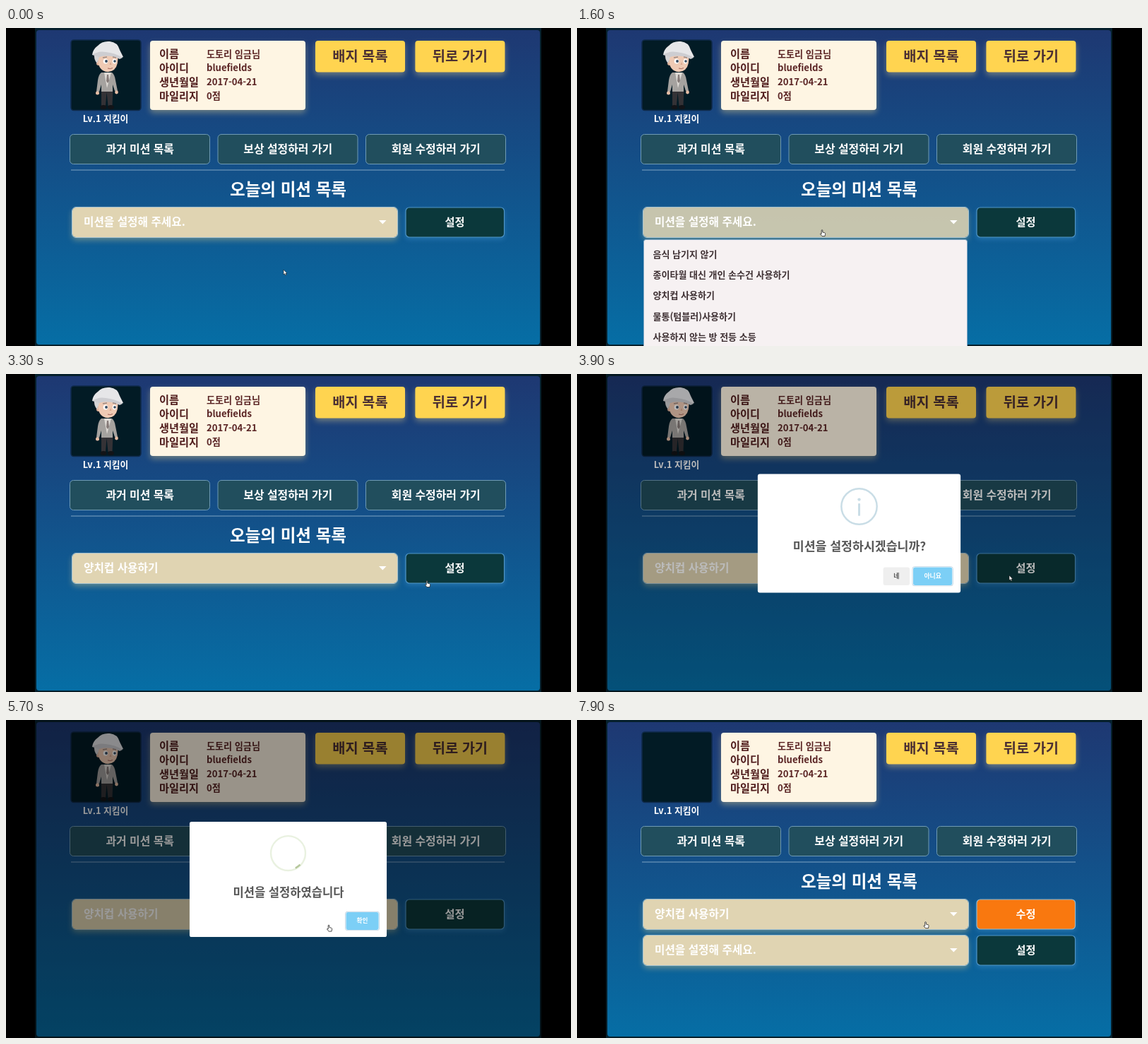
An HTML page for the animation above (8000 ms loop, 800 px wide and 450 px high).

```html
<!DOCTYPE html>
<html lang="ko">
<head>
<meta charset="utf-8">
<style>
html, body { margin: 0; width: 100%; height: 100%; overflow: hidden; background: #000; }
svg { display: block; width: 800px; height: 450px; }
text { font-family: "Noto Sans CJK KR", "Noto Sans CJK", sans-serif; }
.warm { filter: drop-shadow(0 4px 4px rgba(238, 214, 140, .4)); }
.cool { filter: drop-shadow(0 3px 3px rgba(60, 140, 200, .45)); }
</style>
</head>
<body>
<svg id="stage" viewBox="0 0 800 450"></svg>
<script>
const LOOP = 8000;
const OPEN = 1200, PICK = 2500, ASK = 3700, DONE = 5450, CLOSE = 7200, RELOAD = 7500;

// cy is the vertical middle of the glyphs
const text = (x, cy, size, fill, str, anchor = 'start') =>
  `<text x="${x}" y="${cy + size * .36}" font-size="${size}" fill="${fill}" text-anchor="${anchor}" font-weight="700">${str}</text>`;
const mid = (x, cy, size, fill, str) => text(x, cy, size, fill, str, 'middle');
const rect = (x, y, w, h, r, fill, more = '') =>
  `<rect x="${x}" y="${y}" width="${w}" height="${h}" rx="${r}" fill="${fill}" ${more}/>`;
const group = (id, body) => `<g id="${id}">${body}</g>`;

const info = [
  ['이름', '도토리 임금님'], ['아이디', 'bluefields'],
  ['생년월일', '2017-04-21'], ['마일리지', '0점']
].map(([key, val], i) =>
  text(217, 37 + i * 19.7, 15.2, '#4f1c1c', key) +
  text(284, 37 + i * 19.7, 13.1, '#5a2424', val)).join('');

const links = ['과거 미션 목록', '보상 설정하러 가기', '회원 수정하러 가기'].map((s, i) =>
  rect(90.5 + i * 209.5, 150.5, 198, 42, 5, '#214e5d', 'stroke="#6f9bb5"') +
  mid(189.7 + i * 209.5, 171, 15.9, '#fff', s)).join('');

const gold = ['배지 목록', '뒤로 가기'].map((s, i) =>
  rect(438 + i * 141.4, 18, 127, 44.5, 4, '#ffd450', 'class="warm"') +
  mid(501.5 + i * 141.4, 40, 19.8, '#4c3033', s)).join('');

const select = (y, id, label) =>
  group(id, rect(94, y, 460, 42, 5, '#e0d4b2', 'class="warm"')) +
  rect(93.5, y - .5, 461, 43, 5.5, 'none', 'stroke="#a3c2d2"') +
  `<g id="${id}Text">${text(110, y + 20.5, 15.7, '#fff', label)}</g>` +
  `<path d="M528 ${y + 18}h10.5l-5.2 5.4z" fill="#fff"/>`;

const button = (y, label, fill, line) =>
  rect(566, y, 139.5, 42, 5, fill, `stroke="${line}" stroke-width="1.2" class="cool"`) +
  mid(635.5, y + 20.5, 15.2, '#fff', label);

const items = ['음식 남기지 않기', '종이타월 대신 개인 손수건 사용하기', '양치컵 사용하기',
  '물통(텀블러)사용하기', '사용하지 않는 방 전등 소등'];
const menu = rect(94.5, 299.5, 458, 170, 3, '#f6f1f2', 'stroke="#7fa6c4"') +
  items.map((s, i) => text(107.5, 320.3 + i * 29.2, 13, '#3f3134', s)).join('');

const boy = `
  <path d="M135 86l0 24h6l1.5-19 2 19h6l1-24z" fill="#343236"/>
  <ellipse cx="138" cy="112" rx="4.5" ry="3" fill="#121418"/><ellipse cx="148.500" cy="112" rx="4.500" ry="3" fill="#121418"/>
  <path d="M135 63q-4 3-5 11l-2 16h4l3-10v10h16V80l3 9h4l-3-15q-1-8-5-11z" fill="#a5a29f"/>
  <path d="M139 63l4 22 6-22z" fill="#dedad5"/><path d="M143 66h2l1 9-2 3-2-3z" fill="#857a78"/>
  <circle cx="129.500" cy="92" r="2.500" fill="#e6bda5"/><circle cx="156.500" cy="91" r="2.400" fill="#e6bda5"/>
  <circle cx="131" cy="50" r="3" fill="#dcae96"/>
  <path d="M130 38q-1 17 7 22 8 5 16-1 7-6 5-23z" fill="#efcab4"/>
  <path d="M125 36q-1 9 4 14l4-12z" fill="#d4d4d6"/>
  <path d="M122 38q1-8 8-13 6-7 17-6 11 1 14 12l5 10-5 2q-14-8-28-4z" fill="#e6e6e8"/>
  <path d="M122 38q9-6 19-4 13 1 24 8l-4 2q-14-7-29-3z" fill="#cdcdd1"/>
  <ellipse cx="141" cy="47" rx="3.300" ry="3.600" fill="#fff"/><ellipse cx="153.500" cy="47" rx="2.700" ry="3.400" fill="#fff"/>
  <circle cx="142" cy="47" r="1.900" fill="#34485d"/><circle cx="154" cy="47" r="1.800" fill="#34485d"/>
  <path d="M137 42l6-1M151 41l5 1" stroke="#9b8a83" stroke-width="1.3"/>
  <path d="M148 48l1.500 4h-3z" fill="#dba990"/><path d="M144 57q4 1.500 7-.500" stroke="#a5655a" fill="none"/>`;

const page = rect(41, 0, 717, 450, 0, '#06202c') +
  rect(43, 3, 713, 445, 4, 'url(#sky)') +
  rect(92, 17, 99, 99.5, 4, '#021b25', 'stroke="#0f2a4b" stroke-width="1.6"') +
  group('boy', boy) +
  mid(141, 128, 12.8, '#fff', 'Lv.1 지킴이') +
  rect(204, 18, 220, 98, 4, '#fef5e3', 'class="warm"') + info + gold + links +
  rect(92, 200.5, 614, 1, 0, '#7ea3c4') +
  mid(399.5, 228.5, 23.6, '#fff', '오늘의 미션 목록') +
  select(254, 'first', '미션을 설정해 주세요.') +
  group('set', button(254, '설정', '#0b383b', '#5095c6')) +
  group('second', button(254, '수정', '#f9780f', '#8fb9cf') +
    select(305, 'next', '미션을 설정해 주세요.') + button(305, '설정', '#0b383b', '#5095c6')) +
  group('menu', menu);

const dialogButton = (x, w, label) =>
  rect(x - 1.5, 272.8, w + 3, 28.4, 4, '#c2d5e4') + rect(x - .6, 273.6, w + 1.2, 26.8, 3.4, '#fff') +
  rect(x, 274, w, 26, 3, '#7ccff6') + mid(x + w / 2, 286.5, 9, '#fff', label);
const box = rect(254, 140.5, 291, 170, 3, '#fff');
const ask = box +
  `<circle cx="399.5" cy="187" r="25.5" fill="none" stroke="#c9dde6" stroke-width="2.5"/>
   <circle cx="399.5" cy="177" r="2.2" fill="#c9dde6"/>` + rect(398, 182.5, 3, 18, 1.2, '#c9dde6') +
  mid(400, 244.5, 17.5, '#575757', '미션을 설정하시겠습니까?') +
  rect(434, 274, 38, 26, 3, '#efefef') + mid(453, 286.5, 9, '#555', '네') +
  dialogButton(477, 56, '아니요');
const done = box +
  `<circle cx="399.5" cy="187" r="25.5" fill="none" stroke="#e9f1e0" stroke-width="2.5"/>
   <path id="spark" d="M423.5 182.7a25.5 25.5 0 0 1 0 8.6" fill="none" stroke="#b5c79b" stroke-width="2.6"/>
   <path id="check" d="M386 188l9 9.5 20-20" fill="none" stroke="#97b598" stroke-width="3.2" pathLength="100" stroke-dasharray="100 200"/>` +
  mid(400, 244.5, 17.3, '#575757', '미션을 설정하였습니다') + dialogButton(485, 48, '확인');

const cursor =
  `<path id="arrow" d="M0 0v7l1.6-1.4 1.1 2.4 1.2-.6-1-2.3h2z" fill="#fff" stroke="#1a1a1a" stroke-width=".6"/>
   <path id="hand" d="M-.8 0q.8-.9 1.6 0v3l3 .8q1 .4.8 1.6L4 8.6H0L-2.6 5.4q.2-1.2 1.8 0z" fill="#fff" stroke="#222" stroke-width=".8"/>`;

const $ = id => document.getElementById(id);
$('stage').innerHTML =
  `<defs><linearGradient id="sky" x2="0" y2="1"><stop stop-color="#1e3872"/><stop offset="1" stop-color="#066ea5"/></linearGradient></defs>` +
  page + group('dim', rect(41, 0, 717, 450, 0, '#000', 'opacity=".4"')) +
  group('ask', ask) + group('done', done) + group('cursor', cursor);

const chosen = text(110, 274.5, 15.7, '#fff', '양치컵 사용하기');
const prompt = $('firstText').innerHTML;

// time, x, y, hand from here on
const moves = [
  [0, 393, 342, 0], [400, 393, 342, 0], [1000, 350, 288, 1], [1600, 347, 286, 1],
  [2250, 190, 376, 1], [2550, 190, 376, 0], [3200, 596, 293, 1], [3300, 596, 293, 1],
  [3550, 612, 285, 1], [3900, 612, 285, 0], [4400, 525, 296.5, 1], [4600, 525, 296.5, 1],
  [5100, 457, 290.5, 1], [5800, 457, 290.5, 0], [6500, 493.5, 286, 1], [8000, 493.5, 286, 1]
];
const clamp = v => Math.max(0, Math.min(1, v));
const ease = p => p * p * (3 - 2 * p);
const show = (id, on) => $(id).style.display = on ? '' : 'none';

function along(steps, t) {
  let i = 0;
  while (i < steps.length - 2 && t >= steps[i + 1][0]) i++;
  const a = steps[i], b = steps[i + 1], p = clamp((t - a[0]) / (b[0] - a[0]));
  return { p, a, b };
}

const popSteps = [[0, .5], [135, 1.05], [240, .95], [300, 1]];
function pop(id, age) {
  const { p, a, b } = along(popSteps, age);
  const s = a[1] + (b[1] - a[1]) * p;
  $(id).setAttribute('transform', `translate(399.5 225.5) scale(${s}) translate(-399.5 -225.5)`);
}

function draw(t) {
  const reloaded = t >= RELOAD, picked = t >= PICK;
  show('boy', !reloaded);
  show('second', reloaded);
  show('set', !reloaded);
  show('menu', t >= OPEN && !picked);
  $('first').setAttribute('opacity', t >= 900 && t < 1900 ? .88 : 1);
  const label = picked ? chosen : prompt;
  if (draw.label !== label) $('firstText').innerHTML = draw.label = label;

  const fade = 1 - clamp((t - CLOSE) / 300);
  $('dim').setAttribute('opacity', clamp((t - ASK) / 300) * fade);

  show('ask', t >= ASK && t < DONE);
  show('done', t >= DONE && t < CLOSE + 300);
  pop('ask', t - ASK);
  $('ask').setAttribute('opacity', clamp((t - ASK) / 200));
  const age = t - DONE;
  pop('done', age);
  $('done').setAttribute('opacity', fade);
  show('spark', age > 212 && age < 510);
  $('spark').setAttribute('transform', `rotate(${55 - (age - 250) * 1.2} 399.5 187)`);
  show('check', age > 420);
  $('check').setAttribute('stroke-dashoffset', 100 * (1 - clamp((age - 420) / 220)));

  const { p, a, b } = along(moves, t), e = ease(p);
  $('cursor').setAttribute('transform', `translate(${a[1] + (b[1] - a[1]) * e} ${a[2] + (b[2] - a[2]) * e})`);
  show('hand', a[3]);
  show('arrow', !a[3]);
}

const start = performance.now();
function tick() {
  draw((performance.now() - start) % LOOP);
  requestAnimationFrame(tick);
}
tick();
</script>
</body>
</html>
```
